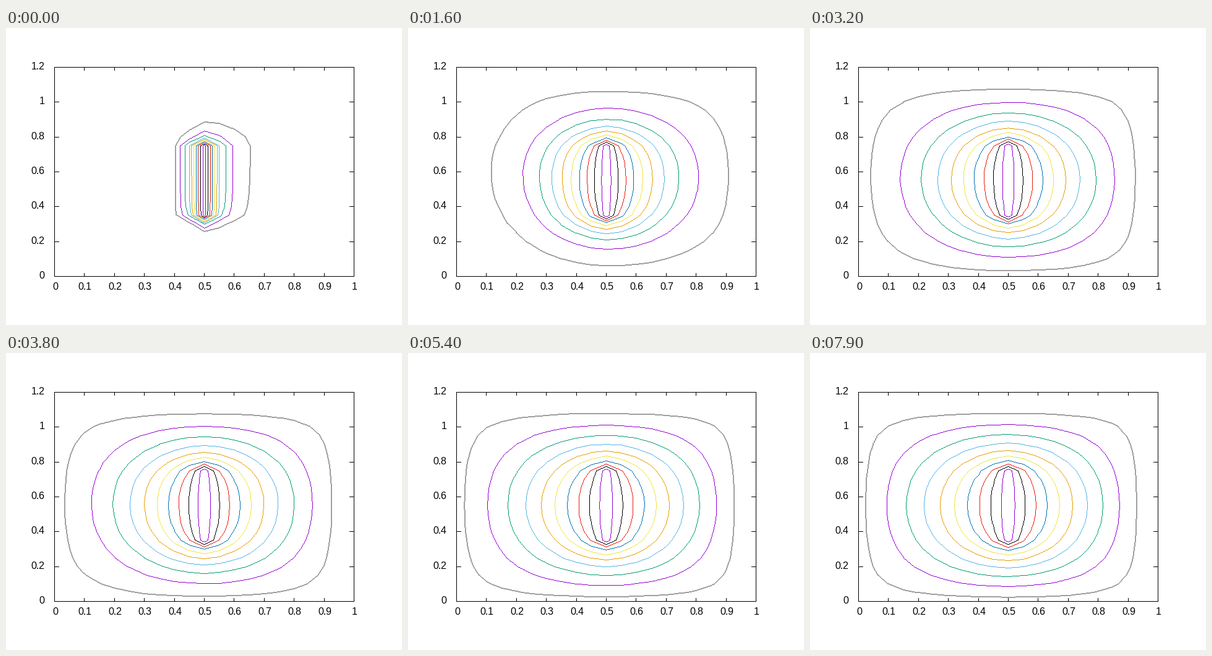
Write a matplotlib script that moves like this. It is 640 by 480 pixels and loops after 8 s.

```python
import numpy as np
import matplotlib.pyplot as plt
from matplotlib.animation import FuncAnimation
from matplotlib.colors import to_rgb

W, H, DPI = 640, 480, 100
FRAMES, INTERVAL = 80, 100
PX = 72 / DPI

LEFT, RIGHT, TOP, BOTTOM = 78, 562, 63, 401
STEP, NX, NY = 0.05, 20, 23
COLD, HOT = 293.0, 493.0
LEVELS = np.arange(300, 481, 20)
COLORS = ["#a0a0a0", "#9400d3", "#009e73", "#56b4e9", "#e69f00",
          "#f0e442", "#0072b2", "#e51e10", "#000000", "#9400d3"]
RGB = [np.round(np.array(to_rgb(c)) * 255).astype(np.uint8) for c in COLORS]

plt.rcParams.update({"font.family": "Liberation Sans",
                     "text.hinting": "default", "text.hinting_factor": 1})


def to_x(x):
    return LEFT + (RIGHT - LEFT) * x


def to_y(y):
    return BOTTOM - (BOTTOM - TOP) * y / 1.2


def sweep(u):
    """One in-place Gauss-Seidel pass; the hot bar stays fixed."""
    for j in range(1, NY - 1):
        for i in range(1, NX - 1):
            if i == 10 and 7 <= j <= 15:
                continue
            u[j, i] = (u[j, i - 1] + u[j, i + 1] + u[j - 1, i] + u[j + 1, i]) / 4


def solve():
    u = np.full((NY, NX), COLD)
    u[7:16, 10] = HOT
    states = []
    for _ in range(FRAMES):
        sweep(u)
        states.append(u.copy())
    return states


fig = plt.figure(figsize=(W / DPI, H / DPI), dpi=DPI, facecolor="white")
ax = fig.add_axes([0, 0, 1, 1])
ax.axis("off")

GRID_X = to_x(np.arange(NX) * STEP)
GRID_Y = to_y(np.arange(NY) * STEP)


def trace(u):
    """Contour polylines per level, snapped to whole pixels."""
    cs = ax.contour(GRID_X, GRID_Y, u, levels=LEVELS)
    segs = [[np.round(s) for s in level if len(s)] for level in cs.allsegs]
    cs.remove()
    return segs


def draw_line(img, p, q, color, width):
    """Hard-edged line, thickened across its minor axis."""
    d = q - p
    n = int(np.abs(d).max())
    pts = np.round(p + np.linspace(0, 1, n + 1)[:, None] * d).astype(int)
    steep = abs(d[1]) > abs(d[0])
    for k in range(width):
        x, y = pts[:, 0], pts[:, 1]
        if steep:
            x = x - k
        else:
            y = y - k
        img[y, x] = color


curves = [trace(u) for u in solve()]
canvas = ax.imshow(np.full((H, W, 3), 255, np.uint8), extent=(0, W, H, 0),
                   interpolation="nearest", aspect="auto", zorder=0)
ax.set_xlim(0, W)
ax.set_ylim(H, 0)


def stroke(xs, ys):
    # Whole coordinates snap to pixel centres.
    ax.plot(xs, ys, color="black", lw=PX, antialiased=False, snap=True,
            solid_capstyle="projecting", zorder=1)


def label(x, y, value, align):
    ax.text(x, y, f"{value:g}", fontsize=16 * PX, ha=align, va="baseline")


stroke([LEFT, RIGHT, RIGHT, LEFT, LEFT], [BOTTOM, BOTTOM, TOP, TOP, BOTTOM])
for k in range(11):
    x = round(to_x(k / 10))
    stroke([x, x], [BOTTOM, BOTTOM - 5])
    stroke([x, x], [TOP, TOP + 5])
    label(x + 1.4, 423, k / 10, "center")
for k in range(7):
    y = round(to_y(k / 5))
    stroke([LEFT, LEFT + 7], [y, y])
    stroke([RIGHT, RIGHT - 7], [y, y])
    label(62.5, y + 4, k / 5, "right")


def draw(n):
    img = np.full((H, W, 3), 255, np.uint8)
    for k, (segs, color) in enumerate(zip(curves[n], RGB)):
        for seg in segs:
            for p, q in zip(seg[:-1], seg[1:]):
                draw_line(img, p, q, color, 2 if k == 0 else 1)
    canvas.set_data(img)
    return [canvas]


anim = FuncAnimation(fig, draw, frames=FRAMES, interval=INTERVAL,
                     init_func=lambda: draw(0), repeat=True, repeat_delay=0)
plt.show()
```
